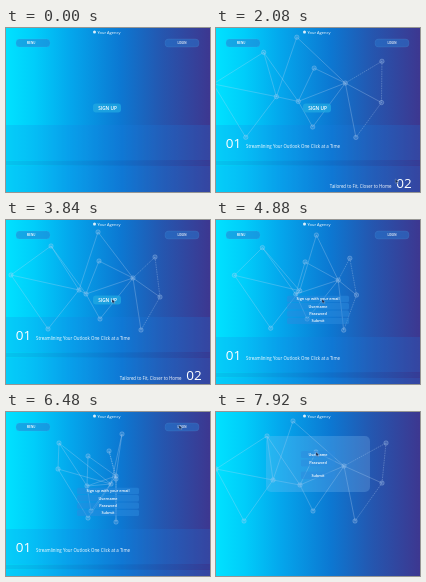
Recreate the animation shown at these times as an HTML page. Size 204 by 164 pixels, loop 8000 ms.

```html
<!DOCTYPE html>
<html lang="en">
<head>
<meta charset="utf-8">
<title>Agency landing page</title>
<style>
html, body { margin: 0; width: 100%; height: 100%; overflow: hidden; background: #0a7ad4; }
svg { display: block; width: 204px; height: 164px; }
text { font-family: "Open Sans", "Noto Sans", sans-serif; fill: #fff; }
.num { font-size: 13.5px; }
.line { font-size: 4.4px; }
.tiny { font-size: 3.8px; text-anchor: middle; }
.form { font-weight: 600; }
.nav { font-size: 2.9px; font-weight: 600; text-anchor: middle; }
.btn { fill: #2878d0; fill-opacity: .5; stroke: #78b4e4; stroke-opacity: .25; stroke-width: .5; }
.band { fill: #1c7ee0; fill-opacity: .2; }
.field { fill: #2c8ce0; fill-opacity: .5; }
.net { stroke: #bcd4f0; stroke-opacity: .45; stroke-width: .65; fill: none; }
.net circle { fill: #a8ccf4; fill-opacity: .2; }
</style>
</head>
<body>
<svg viewBox="0 0 204 164">
  <defs>
    <linearGradient id="sky">
      <stop offset="0" stop-color="#00e2ff"/>
      <stop offset=".14" stop-color="#00cdfa"/>
      <stop offset=".32" stop-color="#04a6ec"/>
      <stop offset=".56" stop-color="#0c78d2"/>
      <stop offset=".76" stop-color="#2457b0"/>
      <stop offset="1" stop-color="#3d3790"/>
    </linearGradient>
  </defs>
  <rect width="204" height="164" fill="url(#sky)"/>

  <g id="content">
    <rect class="band" y="97" width="204" height="35"/>
    <rect y="132.5" width="204" height="5" fill="#1c4fa8" fill-opacity=".2"/>
    <rect class="band" y="138" width="204" height="35"/>
  </g>
  <g id="net" class="net"></g>
  <g id="copy">
    <g id="first">
      <text class="num" x="9.8" y="120">01</text>
      <text class="line" x="30" y="120">Streamlining Your Outlook One Click at a Time</text>
    </g>
    <g id="second">
      <text class="line" x="175.5" y="160" text-anchor="end">Tailored to Fit, Closer to Home</text>
      <text class="num" x="195.8" y="160" text-anchor="end">02</text>
    </g>
  </g>

  <g id="nav">
    <rect class="btn" x="10" y="11" width="34" height="8" rx="3.5"/>
    <text class="nav" x="25" y="16.2">MENU</text>
    <rect class="btn" x="159" y="11" width="34" height="8" rx="3.5"/>
    <text class="nav" x="176" y="16.2">LOGIN</text>
  </g>
  <g id="signup">
    <rect x="87" y="75.5" width="28" height="9" rx="3" fill="#22a9e2" fill-opacity=".75"/>
    <text x="101.5" y="82" text-anchor="middle" font-size="4.7" font-weight="600">SIGN UP</text>
  </g>
  <g id="form"></g>
  <g id="login">
    <rect x="50" y="24" width="104" height="56" rx="5" fill="#8cc4f4" fill-opacity=".25"/>
  </g>

  <circle cx="88.5" cy="4" r="1.5" fill="#fff" fill-opacity=".85"/>
  <text x="91.5" y="5.5" font-size="4">Your Agency</text>
  <path id="cursor" d="M0 0V4.2L1.1 3.2L2 4.8L2.7 4.4L1.9 2.9H3.2Z" fill="#10264c" stroke="#dcecff" stroke-width=".25"/>
</svg>
<script>
const LOOP = 8000, STEP = 80, RESTART = 6640;
const $ = id => document.getElementById(id);
const clamp = v => Math.max(0, Math.min(1, v));
const ease = (t, from, to) => {
  const p = clamp((t - from) / (to - from));
  return p * p * (3 - 2 * p);
};
const show = (id, amount) => $(id).setAttribute("opacity", amount);
const move = (id, x, y) => $(id).setAttribute("transform", `translate(${x} ${y})`);

function make(parent, tag, attrs, label) {
  const el = document.createElementNS("http://www.w3.org/2000/svg", tag);
  for (const key in attrs) el.setAttribute(key, attrs[key]);
  if (label) el.textContent = label;
  return parent.appendChild(el);
}

function field(parent, x, y, w, h, label) {
  make(parent, "rect", { class: "field", x, y, width: w, height: h, rx: 1.5 });
  make(parent, "text", { class: "tiny form", x: x + w / 2, y: y + h / 2 + 1.4 }, label);
}
["Sign up with your email", "Username", "Password", "Submit"].forEach((label, i) =>
  field($("form"), 71, 75.8 + i * 7.3, 62, 6.4, label));
field($("login"), 85, 39, 34, 7, "Username");
field($("login"), 85, 47.5, 34, 7, "Password");
field($("login"), 85, 59.5, 34, 7.5, "Submit");

// Each node at the start, middle and end of its turn: x, y pairs.
const nodes = {
  A: [77, 9, 92, 12, 116, 22],
  B: [51, 24, 45, 26, 53, 31],
  C: [100, 40, 93, 41, 82, 44],
  D: [170, 31, 149, 37, 103, 39],
  E: [128, 54, 127, 58, 110, 64],
  F: [57, 68, 73, 70, 105, 72],
  G: [84, 73, 80, 74, 81, 74],
  H: [166, 71, 154, 77, 110, 67],
  I: [97, 99, 94, 99, 85, 99],
  J: [139, 109, 135, 110, 110, 110],
  K: [28, 109, 42, 109, 82, 106],
  L: [0, 57, 5, 55, 52, 57]
};
const edges = "LB LF LK BF BG FK FG AE AF CE CG GE ED EH DH EI GI EJ HJ".split(" ");
const dotted = ["DH", "HJ", "ED"];
const lines = edges.map(name => make($("net"), "line",
  dotted.includes(name) ? { "stroke-dasharray": "1.6 .8" } : {}));
const dots = Object.keys(nodes).map(() => make($("net"), "circle", { r: 2.2 }));

// Quadratic through the three poses.
function pose([x0, y0, x1, y1, x2, y2], u) {
  const m = 0.4923;
  const a = (u - m) * (u - 1) / m;
  const b = u * (u - 1) / (m * (m - 1));
  const c = u * (u - m) / (1 - m);
  return [x0 * a + x1 * b + x2 * c, y0 * a + y1 * b + y2 * c];
}

function drawNet(age) {
  const at = {};
  Object.keys(nodes).forEach((key, i) => {
    const [x, y] = at[key] = pose(nodes[key], (age - 1280) / 5200);
    dots[i].setAttribute("cx", x);
    dots[i].setAttribute("cy", y);
  });
  edges.forEach((name, i) => {
    const [a, b] = [at[name[0]], at[name[1]]];
    const ends = { x1: a[0], y1: a[1], x2: b[0], y2: b[1] };
    for (const key in ends) lines[i].setAttribute(key, ends[key]);
  });
}

const path = [
  [1900, 184, 158], [2880, 131.5, 80], [3680, 106, 79], [5300, 106, 79],
  [6300, 173, 13], [6960, 173, 13], [7840, 100, 40]
];
function drawCursor(t) {
  let [, x, y] = path[0];
  for (let i = 1; i < path.length; i++) {
    const p = ease(t, path[i - 1][0], path[i][0]);
    x += (path[i][1] - x) * p;
    y += (path[i][2] - y) * p;
  }
  move("cursor", x, y);
  show("cursor", t < path[0][0] ? 0 : 1);
}

function draw(t) {
  const leave = 1 - ease(t, 6520, 6720);
  const open = ease(t, 4080, 4400);
  const again = t >= RESTART;
  const age = again ? t - RESTART : t;

  drawNet(age);
  show("net", ease(age, 80, 640) * (again ? 1 : leave));
  move("content", 0, 20 * open);
  move("copy", 0, 20 * open);
  show("content", leave);
  show("copy", leave);
  show("first", ease(t, 240, 880));
  show("second", ease(t, 560, 1200));
  show("nav", leave);
  show("signup", 1 - open);
  show("form", open * leave);
  show("login", ease(t, 6640, 7040));
  drawCursor(t);
}

function tick(now) {
  draw(Math.floor(now % LOOP / STEP) * STEP);
  requestAnimationFrame(tick);
}
draw(0);
requestAnimationFrame(tick);
</script>
</body>
</html>
```
